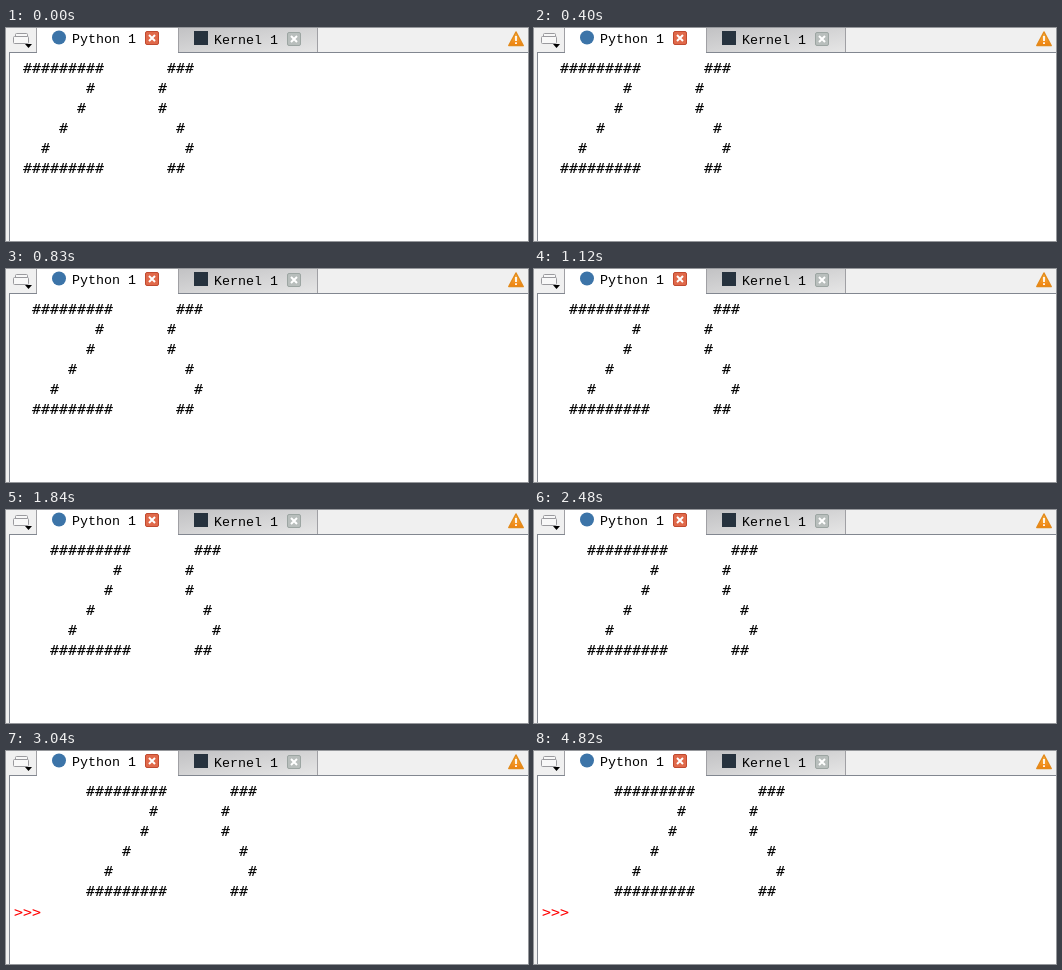
Animation, 522 px wide and 213 px high, one loop 6 s. Source, as an HTML page:

```html
<!DOCTYPE html>
<html lang="en">
<head>
<meta charset="utf-8">
<style>
html, body { margin: 0; width: 100%; height: 100%; overflow: hidden; background: #f0f0f0; }
svg { display: block; width: 522px; height: 213px; }
text { white-space: pre; }
.tab { font: 13.33px "Liberation Mono", monospace; }
.out { font: 14.95px "DejaVu Sans Mono", monospace; }
</style>
</head>
<body>
<svg viewBox="0 0 522 213">
  <defs>
    <linearGradient id="idle" x2="1" y2="1">
      <stop stop-color="#c2c2c4"/>
      <stop offset="1" stop-color="#e6e6e6"/>
    </linearGradient>
    <linearGradient id="warn" x2="0" y2="1">
      <stop stop-color="#f9b84a"/>
      <stop offset="1" stop-color="#ee7f0c"/>
    </linearGradient>
    <g id="close">
      <rect x=".5" y=".5" width="13" height="13" rx="1.5"/>
      <path d="M4 4l6 6m0-6l-6 6" stroke="#fff" stroke-width="2"/>
    </g>
  </defs>

  <rect width="522" height="213" fill="#f0f0f0"/>
  <rect x="3.5" y="24.5" width="530" height="200" fill="#fff" stroke="#828790"/>
  <rect x="173" width="138" height="24" fill="url(#idle)"/>
  <path d="M30.5 0v24M172.5 0v24M311.5 0v24" stroke="#a0a0a4"/>
  <rect x="31" width="141" height="25" fill="#fff"/>

  <!-- tab list button -->
  <g fill="#f8f8f8" stroke="#9a9a9e">
    <rect x="9.5" y="5.5" width="12" height="7" rx="1"/>
    <rect x="7.5" y="8.5" width="15" height="7" rx="1"/>
  </g>
  <path d="M19 16h7l-3.5 4z"/>

  <circle cx="53" cy="9.5" r="7" fill="#3c74a8"/>
  <text class="tab" x="66" y="15">Python 1</text>
  <use href="#close" x="139" y="3" fill="#e0694a" stroke="#c04a30"/>

  <rect x="188" y="3" width="14" height="14" fill="#26323e"/>
  <text class="tab" x="208" y="16">Kernel 1</text>
  <use href="#close" x="281" y="4" fill="#b8bebc" stroke="#9ca5a2"/>

  <path d="M510 4l7.2 13.5h-14.4z" fill="url(#warn)" stroke="#e28a1c" stroke-width="1.5" stroke-linejoin="round"/>
  <path d="M510 8v5m0 1.3v1.8" stroke="#fff" stroke-width="1.8"/>

  <g id="art" class="out"></g>
  <text id="prompt" class="out" x="8" y="166" fill="#f00">&gt;&gt;&gt;</text>
</svg>
<script>
const LOOP = 6000, CELL = 9, LINE = 20;
const rows = [
  "#########       ###",
  "       #       #",
  "      #        #",
  "    #            #",
  "  #               #",
  "#########       ##"
];
// [start in ms, indent in characters]
const steps = [[0, 1], [400, 2], [1120, 3], [1840, 4], [2480, 5], [3040, 8]];

const art = document.getElementById("art");
const prompt = document.getElementById("prompt");
rows.forEach((row, i) => {
  const line = document.createElementNS("http://www.w3.org/2000/svg", "text");
  line.setAttribute("x", 8);
  line.setAttribute("y", 45 + i * LINE);
  line.textContent = row;
  art.append(line);
});

function draw(now) {
  const t = now % LOOP;
  const [start, indent] = steps.findLast(s => s[0] <= t);
  art.setAttribute("transform", `translate(${indent * CELL})`);
  prompt.setAttribute("visibility", start === 3040 ? "visible" : "hidden");
}

function tick() {
  draw(performance.now());
  requestAnimationFrame(tick);
}
tick();
</script>
</body>
</html>
```
